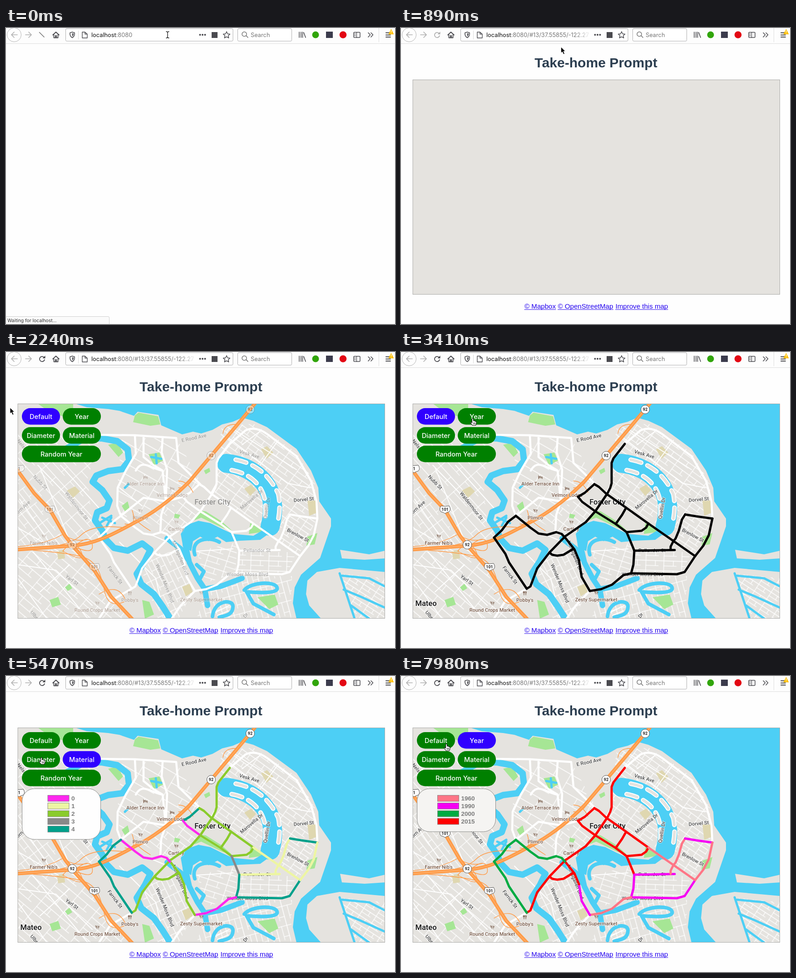
An HTML page that plays this animation: 857x654 px, repeating every 8000 ms.

```html
<!DOCTYPE html>
<html lang="en">
<head>
<meta charset="utf-8">
<title>Take-home Prompt</title>
<style>
html, body { margin: 0; width: 100%; height: 100%; overflow: hidden; background: #fefefe; }
svg { display: block; }
text { font-family: Inter, "Open Sans", sans-serif; }
.page text { font-family: "Liberation Sans", Arial, sans-serif; }
.map text { font: 500 11px Roboto, "Open Sans", sans-serif; text-anchor: middle; dominant-baseline: central;
  paint-order: stroke; stroke: #fffc; stroke-width: 2px; stroke-linejoin: round; }
.map .city { font-size: 16.5px; }
.map .shield text { font-size: 9px; font-weight: 700; stroke: none; }
.button text { font-size: 14.5px; font-weight: 500; fill: #fff; text-anchor: middle; }
.line { fill: none; stroke-linecap: round; stroke-linejoin: round; }
</style>
</head>
<body>
<script>
const line = (d, color, width, extra = '') =>
  `<path class="line" d="${d}" stroke="${color}" stroke-width="${width}" ${extra}/>`;
const area = (d, color) => `<path d="${d}" fill="${color}"/>`;
const rect = (x, y, w, h, fill, extra = '') =>
  `<rect x="${x}" y="${y}" width="${w}" height="${h}" fill="${fill}" ${extra}/>`;
const LAND = '#e5e3df', WATER = '#4dcff5', PARK = '#a6e695', SCHOOL = '#dfd7b0', ORANGE = '#ff9c49';

// Pipes: path, then the legend row for material, diameter and year
const routes = [
  ['M493 203L468 235 464 245V290L461 300 455 312 428 352 407 376 362 407 327 443 300 478 290 505 285 518 277 523', '203'],
  ['M390 320L405 311 426 292', '403'],
  ['M390 320L399 331 428 352', '013'],
  ['M426 292L436 298 452 313 496 344 545 379', '203'],
  ['M428 352L473 380 497 398', '203'],
  ['M496 344L487 360 473 380', '203'],
  ['M545 379L540 388 530 395 497 398', '203'],
  ['M497 398L505 417 514 439', '303'],
  ['M545 379L648 451', '120'],
  ['M514 439L603 437.5', '131'],
  ['M514 439L512 470 507 489', '431'],
  ['M507 489L608 491 625 486 648 451', '431'],
  ['M594 437V430L600 418 605 412 612 395 619 370 626 359', '120'],
  ['M626 359L650 363 686 368', '441'],
  ['M686 368L678 405 666 428 648 451', '120'],
  ['M507 489L490 493 465 514 441 524 416 528', '020'],
  ['M416 528L398 497 392 460', '231'],
  ['M392 460L382 436 360 408', '203'],
  ['M327 443L333 448 344 450 358 448 378 436', '203'],
  ['M253 362L285 388 303 401 322 404 342 398 354 402 361 410', '052'],
  ['M253 362L236 375 222 394 205 410', '452'],
  ['M205 410L230 446 238 465 277 523', '452'],
];
const legends = [
  { x: 92, fill: '#fefefe', rows: { 0: '#ff28ee', 1: '#edf5a3', 2: '#8acb2c', 3: '#898989', 4: '#00a08b' } },
  { x: 88, fill: '#fefefe', rows: { 4: '#74c5eb', 6: '#ff00dd', 8: '#343b1c', 12: '#3600d8', 20: '#2b22f0', 30: '#abc68b' } },
  { x: 80.5, fill: '#f5f4f2', rows: { 1960: '#ff7686', 1990: '#f500f3', 2000: '#00ab42', 2015: '#ff0000' } },
];
const buttons = [
  ['Default', 35, 124, 84], ['Year', 125, 124, 84],
  ['Diameter', 35, 166, 84], ['Material', 125, 166, 84], ['Random Year', 35, 207, 174],
];

// Street grids: turn, spacing, outline
const grids = [
  [52, 24, 'M26 275L140 430 26 430Z'],
  [40, 30, 'M26 442L150 434 275 589H26Z'],
  [48, 34, 'M26 180H209L180 280 190 380 215 405 150 425 26 250Z'],
  [30, 40, 'M255 190H375L430 290 350 335 255 375 245 300Z'],
  [36, 22, 'M475 165L545 158 640 222 680 290 684 360 625 358 600 400 500 345 460 310 466 240Z'],
  [34, 20, 'M626 362L684 370 645 448 600 420Z'],
  [2, 22, 'M515 442H640L620 488 510 487Z'],
  [64, 22, 'M300 485L330 445 380 440 412 530 380 589H335Z'],
  [18, 24, 'M420 440L510 420 505 490 440 510Z'],
  [75, 24, 'M440 530L510 495H630L628 589H420Z'],
  [38, 26, 'M362 408L430 355 390 325 300 370Z'],
  [33, 18, 'M738 490L835 500V589H765Z'],
].map(([turn, size, d], i) => `
  <pattern id="grid${i}" width="${size * 1.8}" height="${size}" patternUnits="userSpaceOnUse" patternTransform="rotate(${turn})">
  ${line(`M0 1H${size * 1.8}M0 ${size * .55}H${size * 1.3}M1 0V${size}M${size} 0V${size * .55}`, '#fff', 1.3)}</pattern>` +
  area(d, `url(#grid${i})`)).join('');

const roads = [
  'M205 183L285 184 375 190 380 245 428 292',
  'M284 185L286 225 264 262 246 300 245 340 253 362',
  'M303 186V232L325 250 345 262 352 330 342 360 340 396',
  'M345 190L343 222 355 260 352 330',
  'M286 262C300 235 320 258 344 262',
  'M253 362L303 322 352 330 390 320',
  'M493 203L528 173Q550 163 575 181L640 230 672 285 684 330 686 368',
  'M464 292L452 313',
  'M416 528L385 560 365 589',
  'M277 523L230 550 205 589',
];
const streets = 'M26 500L90 589M60 442L180 589M26 388L115 440M30 325L95 420M70 250L190 375M120 250L205 345' +
  'M26 470L110 482 190 560M75 255L145 430M140 470L75 530M250 420L330 500 350 589M320 404L380 430' +
  'M250 300L300 340M420 440L500 435M500 170L640 260M490 190L620 290 670 300M520 205L560 175M600 195L560 250';

const coast = 'M152 114L178 122 225 126 250 130 282 141 290 132 336 139 342 162 388 182 412 176 430 180 455 172 ' +
  '476 160 500 154 520 145 545 152 575 166 640 214 672 262 688 300 690 330 716 368 716 385 704 420 692 455 ' +
  '650 492 636 520 632 555 640 589H694L668 560 661 535 664 505 685 486 735 477 835 486V114Z';
const spit = 'M736 437L762 441 800 447 835 439V456L790 459 740 456Z';
const slough = 'M130 215L175 190 212 191 245 197 268 215 271 240 256 259 225 263 199 273 191 287 212 305 228 328 ' +
  '222 345 201 354 196 372 213 396 218 412 238 433 268 439 300 423 318 437 306 462 288 490 298 513 326 535 345 562 362 589';
const lagoon = 'M385 402L398 382 424 373 450 378 476 391 500 402 545 406 575 388 586 378 592 392 560 415 515 417 ' +
  '485 420 466 408 446 418 428 408 412 418 408 440 390 430Z';
const arc = 'M486 246C540 252 578 285 586 328 Q590 355 582 385';
const outer = 'M506 238C550 246 582 274 600 314Q606 345 598 378';
const inner = 'M497 261C535 268 562 290 570 325Q574 350 570 372';
const fingers = [outer, inner].map(d =>
  line(d, '#fff', 10, 'stroke-dasharray="24 15"') + line(d, LAND, 6, 'stroke-dasharray="24 15"')).join('');
const highway92 = 'M550 112L500 172 452 229 405 285Q355 336 300 368C250 394 205 424 146 428L20 437';
const highway101 = 'M22 257L62 312 97 349 130 406 150 432 195 483 232 541 280 592';
const ramps = 'M60 434Q140 430 165 405T260 388M60 438Q150 445 175 455T210 500M110 375Q130 425 180 414' +
  'M125 440Q150 410 165 440T125 440M150 430Q185 400 190 425T150 430M380 285Q400 285 412 310M380 300Q408 300 410 275' +
  'M280 360Q285 375 318 395M262 380Q290 385 278 350M478 180Q480 160 505 160M205 535Q245 510 262 545' +
  'M215 515Q220 570 260 552M26 430Q90 425 130 400';

const parks = 'M284 140L292 134 335 142 340 160 318 163 280 155ZM70 114H148V150L95 132ZM425 350L440 352 475 374 ' +
  '497 394 478 389 430 366 415 372ZM538 378L560 386 585 382 575 396 535 402ZM554 542L592 536 600 558 580 568Z' +
  'M300 548L316 552 326 580 306 589ZM96 548L115 541 121 558 102 564ZM314 226L338 222 346 240 326 250Z' +
  'M664 408L686 400 680 425 662 428ZM372 357L384 360 380 368 370 366ZM436 262L448 256 450 264 440 270Z' +
  'M225 205L245 200 258 222 248 232ZM255 340L268 330 272 344 262 352ZM130 520L140 512 146 522 136 528Z';
const schools = 'M134 306L152 297 163 308 148 322ZM525 302L540 293 551 305 538 318ZM562 215L575 208 589 222 574 236Z' +
  'M664 328L684 328 685 355 668 362ZM388 519L405 512 411 530 396 540ZM112 440L128 437 130 456 115 458Z';

const label = (text, x, y, turn = 0, fill = '#4a4a4a', extra = '') =>
  `<text transform="translate(${x} ${y}) rotate(${turn})" fill="${fill}" ${extra}>${text}</text>`;
const icons = {
  bed: 'M-4-3V4M-4 2H4V0H-4M4 2V4M-2-1H0', cart: 'M-4-3H-3L-2 1H3L4-2H-2M-1 3.5H-.8M2.5 3.5H2.7',
  fork: 'M-2-4V4M-3.5-4V-1H-.5V-4M2 4V-4Q4-2 2 1',
};
const places = [
  ['Alder Terrace Inn', 307, 291, 'bed'], ['Velmor Lodge', 366, 316, 'bed'], ['Plimco', 296, 366, 'cart'],
  ['Cartley', 375, 391, 'cart'], ["Farmer Nib's", 83, 422, 'cart'], ["Pobby's", 273, 548, 'fork'],
  ['Round Crops Market', 201, 570, 'cart'], ['Zesty Supermarket', 430, 547, 'cart'],
].map(([name, x, y, icon]) => label(name, x, y, 0, '#785a49') +
  line(icons[icon], '#785a49', 1.2, `transform="translate(${x} ${y - 15})"`)).join('');
const streetNames = [
  ['E Rood Ave', 414, 190, -12], ['Vesk Ave', 536, 226, 16], ['Marovella Dr', 541, 326, -40],
  ['Quellin Dr', 575, 345, -80], ['Pellandor St', 553, 438, 0], ['Wender Moss Blvd', 532, 491, 0],
  ['Wender Moss Blvd', 350, 511, 68], ['Mossgallen Blvd', 384, 455, 68], ['Farrick St', 240, 493, 53],
  ['Yarl St', 145, 504, 36], ['Nubb St', 75, 288, 46], ['Waldenmoor St', 155, 340, 52],
  ['orn Ave', 38, 343, -42], ['Nels', 33, 203, 50], ['Ulbr', 62, 581, 50], ['Dr', 528, 582, -55],
].map(s => label(...s)).join('');
const shield = (text, x, y) => `<g class="shield" transform="translate(${x} ${y})">` +
  (text == '92' ? '<circle r="9.5" fill="#fff" stroke="#555"/>' :
    '<path d="M-9-8Q0-6 9-8Q14 0 9 5Q3 6 0 9Q-3 6-9 5Q-14 0-9-8Z" fill="#fff" stroke="#555"/>') +
  `<text fill="#222">${text}</text></g>`;
const shields = [['92', 538, 127], ['92', 452, 229], ['92', 146, 426], ['101', 97, 348], ['101', 195, 475], ['1', 29, 258]]
  .map(s => shield(...s)).join('');

const tiles = grids + area(parks, PARK) + area(schools, SCHOOL) + line(streets, '#fff', 2) +
  area(coast, WATER) + area(spit, LAND) + line(slough, WATER, 14) + area(lagoon, WATER) +
  line(arc, WATER, 42) + fingers +
  line('M395 425L404 465 422 500 438 524 475 517 520 500M438 524L444 560M355 412L385 435 402 460', WATER, 12) +
  line('M416 448C405 415 445 405 470 420M420 470L436 485 428 500M455 584C458 548 500 545 500 562S488 582 470 586' +
    'M525 526C540 508 592 506 597 520S560 532 530 530L545 556 590 580', WATER, 8) +
  line('M462 575L492 560M466 582L490 572', '#fff', 2) +
  line('M735 489L768 589M738 494L800 500 835 518M744 525L780 540 835 565M760 560L800 589', WATER, 5) +
  line('M206 378L232 362M212 366L240 378M222 384L232 366M262 300L270 292M320 232L342 236M330 226L332 246', WATER, 5) +
  line(roads.concat(routes.map(r => r[0])).join(''), '#fff', 4.5) +
  line(ramps, ORANGE, 1.4) +
  [highway92, highway101].map(d => line(d, ORANGE, 8) + line(d, '#ffbd82', 1)).join('');

const gray = '#4a4a4f';
const toolbar = rect(0, 0, 857, 34, '#fdfdfd') + line('M0 34.5H857', '#dedede', 1) +
  '<circle cx="18" cy="15" r="15.5" fill="#fefefe" stroke="#b4b4b4"/>' +
  line('M25 15H12M18 9L12 15 18 21M43 15H56M50 9L56 15 50 21', '#b0b0b0', 1.7) +
  '<g id="reload"></g>' +
  line('M103 15.5L110 9 117 15.5M105.5 15V21.5H114.500V15M109 21V17H111V21', gray, 1.8) +
  rect(131.5, 1.5, 368.5, 27.5, '#fff', 'rx="2.500" stroke="#aeaeb0"') +
  line('M141 10.500L146 9 151 10.500Q152 18 146 21.500Q140 18 141 10.500Z', gray, 1.6) +
  area('M146 11.5V19Q149 17 149 12Z', gray) + line('M159.5 6V25', '#d8d8d8', 1) +
  line('M168 9H174L179 13.500V22H168ZM174 9V13.500H179', gray, 1.4) +
  '<text id="url" x="188" y="20" font-size="12.8" fill="#777"></text>' +
  rect(384, 4, 34, 22, 'url(#fade)') + rect(417, 4, 82, 22, '#fff') +
  [427.5, 433, 438.5].map(x => `<circle cx="${x}" cy="15" r="2" fill="${gray}"/>`).join('') +
  rect(453, 9, 13, 13, gray) +
  line('M486 8L488.300 13 493.500 13.500 489.600 17 490.700 22 486 19.300 481.300 22 482.400 17 478.500 13.500 483.700 13Z', gray, 1.5) +
  rect(510.5, 1.5, 119, 27.5, '#fff', 'rx="2.500" stroke="#aeaeb0"') +
  '<circle cx="525" cy="13.500" r="5" fill="none" stroke="#777" stroke-width="1.5"/>' + line('M529 17L533 21', '#777', 1.7) +
  '<text x="539" y="20" font-size="12.8" fill="#777">Search</text>' +
  line('M646 9V21M650 9V21M653.500 9V21M656 10L660 21', gray, 1.6) +
  '<circle cx="682" cy="15" r="7.500" fill="#31a50a"/>' + rect(705, 8, 15, 14, '#3b3b4c') +
  '<circle cx="742.500" cy="15" r="7.800" fill="#e30613"/>' +
  rect(766, 9.5, 14, 11.5, 'none', `rx="1.500" stroke="${gray}" stroke-width="1.5"`) +
  line('M772.500 10V21M768 12.500H770M768 15H770M768 17.500H770', gray, 1.2) +
  line('M798 10.500L802.500 15 798 20M804 10.500L808.500 15 804 20', gray, 1.6) +
  line('M821.500 0V31', '#dedede', 1) + line('M837 10.500H847M837 15.500H847M837 20H847', gray, 1.8) +
  area('M848.500 2L854.500 14H842.500Z', '#ffbf00') + line('M848.500 6V9.500M848.500 12V12.100', '#fff', 1.3);

const link = (text, x, w) => `<text x="${x}" y="620" font-size="15.1" fill="#2200ee">${text}</text>` +
  line(`M${x} 622H${x + w}`, '#2200ee', 1);

document.body.innerHTML = `<svg width="857" height="654" viewBox="0 0 857 654">
<defs>
  <linearGradient id="fade"><stop stop-color="#fff" stop-opacity="0"/><stop offset="1" stop-color="#fff"/></linearGradient>
  <clipPath id="frame">${rect(26, 114, 809, 475, '#000')}</clipPath>
</defs>
${toolbar}
<g id="status">${rect(-1, 637.5, 228.5, 20, '#fbfbfb', 'rx="2.500" stroke="#cfcfcf"')}
  <text x="3" y="650" font-size="10.3" fill="#333">Waiting for localhost...</text></g>
<g id="page" class="page">
  <text x="429.500" y="87" font-size="30.100" font-weight="700" fill="#2c3e50" text-anchor="middle">Take-home Prompt</text>
  ${link('© Mapbox', 272, 69)}${link('© OpenStreetMap', 345.5, 122)}${link('Improve this map', 472.5, 115.5)}
</g>
<g id="map" class="map" clip-path="url(#frame)">
  ${rect(26, 114, 809, 475, LAND)}
  <g id="tiles">${tiles}</g>
  <g id="labels">${streetNames}${places}${shields}${label('Foster City', 455, 331, 0, '#111', 'class="city"')}</g>
  <g id="early">${label('Dorvel St', 656, 326, -5)}${label('Brenlow St', 643, 405, 28)}</g>
  <g id="late">${label('Mateo', 55, 555, 0, '#111', 'class="city"')}</g>
  <g id="routes">${routes.map(([d]) => line(d, '#000', 5, 'stroke-linecap="butt"')).join('')}</g>
</g>
<g id="border">${rect(26, 114.5, 808.5, 474, 'none', 'stroke="#a9a9a7"')}</g>
<g id="buttons">${buttons.map(([name, x, y, w]) => `<g class="button">${rect(x, y, w, 36.5, '#008000', 'rx="18.250"')}
  <text x="${x + w / 2}" y="${y + 23.5}">${name}</text></g>`).join('')}</g>
<g id="legend" class="page"></g>
<g id="cursor"></g>
</svg>`;

const el = id => document.getElementById(id);
const show = (id, amount) => el(id).setAttribute('opacity', Math.max(0, Math.min(1, amount)));

const pointers = {
  beam: line('M-3-7Q0-7 0-5V5Q0 7 3 7M3-7Q0-7 0-5M0 5Q0 7-3 7', '#111', 1.3),
  arrow: '<path d="M0 0V13L3 10.500 5.500 16 8 15 5.500 9.500H9.500Z" fill="#000" stroke="#fff" stroke-width=".8"/>',
  hand: '<path d="M-1.500 1Q0-1 1.500 1V5Q3 4 4 5.500Q5.500 5 6 6.500Q8 6 8 8V11L6.500 15H-.5L-4.500 10Q-5.500 7.500-3.500 8L-1.500 9.500Z"' +
    ' fill="#fff" stroke="#111" stroke-width="1.1"/>' + line('M1.500 9V12.500M3.500 9V12.500M5.300 9V12.500', '#111', .8),
};
// Cursor stops: step, x, y
const stops = [[0, 356, 15], [3, 356, 17], [4, 354, 34], [6, 352.5, 42], [8, 345, 52], [15, 9, 123], [17, 9, 125],
  [22, 158, 147], [26, 158, 147], [29, 165, 192], [31, 164, 182], [33, 164, 182], [37, 78, 180], [38, 78, 180],
  [40, 105, 175], [44, 161, 136], [48, 161, 136], [53, 106, 151], [54, 100, 150]];

function cursorAt(step) {
  const i = Math.max(1, stops.findIndex(s => s[0] >= step));
  const [a, ax, ay] = stops[i - 1], [b, bx, by] = stops[i];
  const u = (step - a) / (b - a), ease = u * u * (3 - 2 * u);
  return [ax + (bx - ax) * ease, ay + (by - ay) * ease];
}

function drawLegend(mode) {
  if (mode < 0) return '';
  const { x, fill, rows } = legends[mode], items = Object.entries(rows);
  return rect(35.5, 249, 173, 27 + 17 * items.length, fill, 'rx="27" stroke="#8a8a88"') +
    items.map(([name, color], i) => rect(x, 263.5 + 17 * i, 47, 13.5, color, 'stroke="#888"') +
      `<text x="${x + 52}" y="${275 + 17 * i}" font-size="13.500" font-weight="700" fill="#7b7b7b">${name}</text>`).join('');
}

function draw(step) {
  const mode = step < 25 ? -1 : step < 33 ? 2 : step < 38 ? 0 : step < 47 ? 1 : 2;
  const active = [mode < 0, mode == 2 || step == 46, mode == 1, mode == 0, false];
  const loaded = step >= 5;
  show('status', step < 4);
  show('page', step >= 4);
  show('map', loaded);
  show('border', loaded);
  show('tiles', (step - 10) / 2);
  show('buttons', step >= 13);
  show('labels', (step - 14) * .4);
  show('early', step >= 15);
  show('late', step >= 17);
  show('routes', step >= 18);
  el('url').innerHTML = '<tspan fill="#111">localhost</tspan>:8080' + (loaded ? '/#13/37.55855/-122.27' : '');
  const ink = step < 8 ? '#b0b0b0' : gray;
  el('reload').innerHTML = step < 4
    ? line('M73.500 9.500L84 20' + (step ? 'M84 9.500L73.500 20' : ''), step ? gray : '#777', 1.6)
    : line('M84 12A5.600 5.600 0 1 0 85 17', ink, 1.8) + area('M86.500 8V14H80.500Z', ink);
  [...el('routes').children].forEach((path, i) => path.setAttribute('stroke',
    mode < 0 ? '#000' : Object.values(legends[mode].rows)[routes[i][1][mode]]));
  [...el('buttons').children].forEach((button, i) =>
    button.firstElementChild.setAttribute('fill', active[i] ? '#3000ff' : '#008000'));
  el('legend').innerHTML = drawLegend(mode);
  const [x, y] = cursorAt(step);
  const over = step >= 13 && buttons.some(([, bx, by, w]) => x > bx && x < bx + w && y > by && y < by + 37);
  const kind = y < 30 ? 'beam' : over || step > 23 ? 'hand' : 'arrow';
  el('cursor').innerHTML = pointers[kind];
  el('cursor').setAttribute('transform', `translate(${x} ${y})`);
}

const LOOP = 8000, STEP = 147.7;
let last = -1;
function tick() {
  const step = Math.min(54, Math.floor(performance.now() % LOOP / STEP));
  if (step != last) draw(last = step);
  requestAnimationFrame(tick);
}
tick();
</script>
</body>
</html>
```
